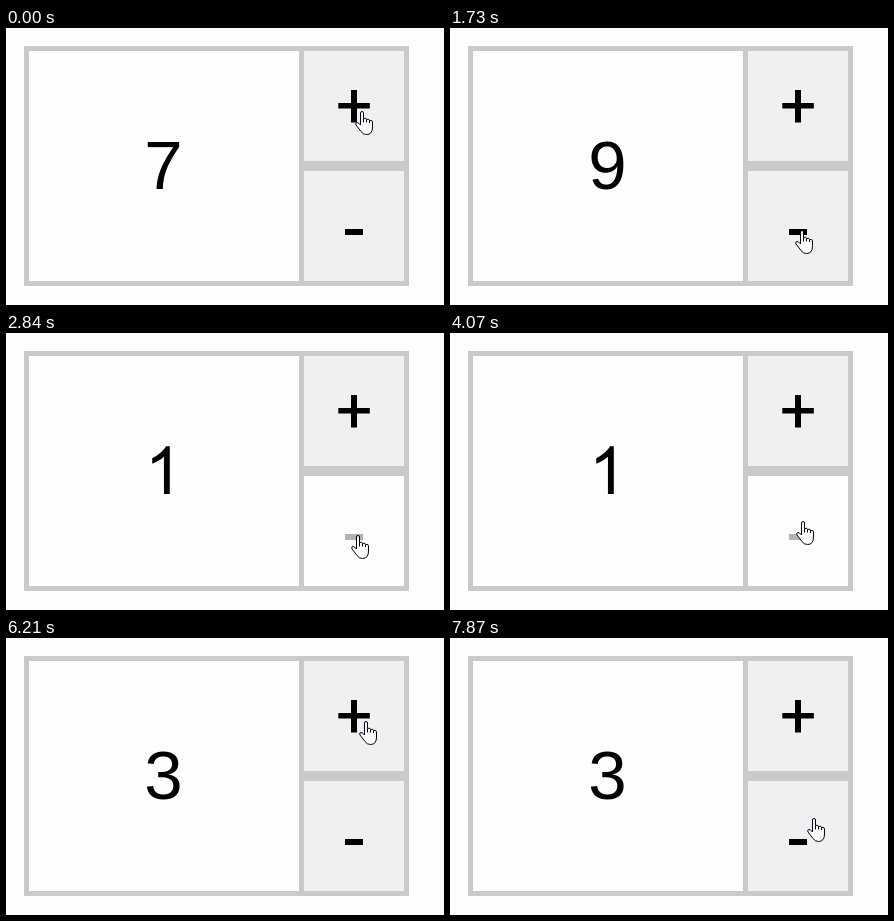
Write an HTML page with a canvas that moves like this. It is 438 px wide and 277 px high and loops after 7.99 s.

```html
<!DOCTYPE html>
<html lang="en">
<head>
<meta charset="utf-8">
<title>Counter</title>
<style>
  html, body { margin: 0; width: 100%; height: 100%; overflow: hidden; background: #fefefe; }
  canvas { display: block; }
</style>
</head>
<body>
<canvas id="stage" width="438" height="277"></canvas>
<script>
const ctx = document.getElementById('stage').getContext('2d');
const LOOP = 7990;
const SIZE = 69;
const ADVANCE = 37;
const TICK = 135;

// Bursts of evenly spaced clicks
const BURSTS = [
  { step: 1, from: 150, count: 4, gap: 130 },
  { step: -1, from: 1580, count: 10, gap: 140 },
  { step: 1, from: 5930, count: 1, gap: 140 },
  { step: 1, from: 6210, count: 5, gap: 140 },
  { step: -1, from: 7350, count: 4, gap: 173 }
];

// The pointer rests between glides
const HOME = { x: 349, y: 83 };
const GLIDES = [
  { from: 810, to: 1180, x: 345, y: 202 },
  { from: 3520, to: 4070, x: 346, y: 188, sway: 14 },
  { from: 4220, to: 4520, x: 340, y: 244 },
  { from: 4520, to: 4870, x: 316, y: 230 },
  { from: 5020, to: 5390, x: 334, y: 193 },
  { from: 5390, to: 5800, x: 353, y: 83 },
  { from: 6770, to: 6900, x: 356, y: 143 },
  { from: 6900, to: 7200, x: 357, y: 180 }
];

const ONE = new Path2D('M763 0H583V-1147Q518-1085 412.5-1023 307-961 223-930V-1104' +
  'Q374-1175 487-1276 600-1377 647-1472H763Z');
const HAND = new Path2D('M5.5 13V2Q5.5 .5 7 .5 8.5 .5 8.5 2V7.5Q11.5 6.5 11.5 8.5' +
  'Q14.5 7.5 14.5 9.5 17.5 8.7 17.5 11V16Q17.5 23.5 11.5 23.5 8 23.5 6 20.5' +
  'L1 14Q0 11.5 2 11.5 3.5 11.5 5.5 14Z');
const FOLDS = new Path2D('M8.5 7.5V11.5M11.5 8.5V11.5M14.5 9.5V12');

const clamp = (v, lo, hi) => Math.min(hi, Math.max(lo, v));

function box(color, x, y, w, h) {
  ctx.fillStyle = color;
  ctx.fillRect(x, y, w, h);
}

function countAt(t) {
  return BURSTS.reduce((n, { step, from, count, gap }) =>
    n + step * clamp(Math.floor((t - from) / gap) + 1, 0, count), 7);
}

// Each glide advances in equal, discrete steps
function pointerAt(t) {
  let { x, y } = HOME;
  for (const g of GLIDES) {
    if (t < g.from) break;
    const steps = Math.round((g.to - g.from) / TICK);
    const u = Math.floor(clamp((t - g.from) / (g.to - g.from), 0, 1) * steps) / steps;
    x += (g.x - x) * u + (g.sway || 0) * Math.sin(2 * Math.PI * u);
    y += (g.y - y) * u;
  }
  return [Math.round(x), Math.round(y)];
}

function drawNumber(n, cx, base) {
  const digits = String(n);
  let x = cx - (digits.length - 1) * ADVANCE / 2;
  ctx.fillStyle = '#000';
  ctx.textAlign = 'center';
  ctx.font = SIZE + 'px Arial, "Liberation Sans", sans-serif';
  for (const d of digits) {
    if (d === '1') {
      // Plain one, without a foot
      ctx.save();
      ctx.translate(x - ADVANCE / 2, base);
      ctx.scale(ADVANCE / 1139, ADVANCE / 1139);
      ctx.fill(ONE);
      ctx.restore();
    } else {
      ctx.fillText(d, x, base);
    }
    x += ADVANCE;
  }
}

function drawPointer(x, y) {
  ctx.save();
  ctx.translate(x, y);
  ctx.fillStyle = '#fff';
  ctx.strokeStyle = '#000018';
  ctx.lineWidth = 1;
  ctx.lineJoin = 'round';
  ctx.fill(HAND);
  ctx.stroke(HAND);
  ctx.stroke(FOLDS);
  ctx.restore();
}

function draw(t) {
  const n = countAt(t);
  const off = n <= 1;
  box('#fefefe', 0, 0, 438, 277);
  box('#cacaca', 18, 18, 385, 240);
  box('#fefefe', 23, 23, 270, 230);
  box('#f0f0f0', 298, 23, 100, 110);
  box(off ? '#fdfdfd' : '#f0f0f0', 298, 143, 100, 110);

  box('#000', 332.3, 75, 31.5, 5.5);
  box('#000', 345, 62, 6, 32.5);
  box(off ? '#b3b3b3' : '#000', 339, 201, 18, 6);

  drawNumber(n, 157.5, 161);
  drawPointer(...pointerAt(t));
}

const start = performance.now();
function tick() {
  draw((performance.now() - start) % LOOP);
  requestAnimationFrame(tick);
}
tick();
</script>
</body>
</html>
```
